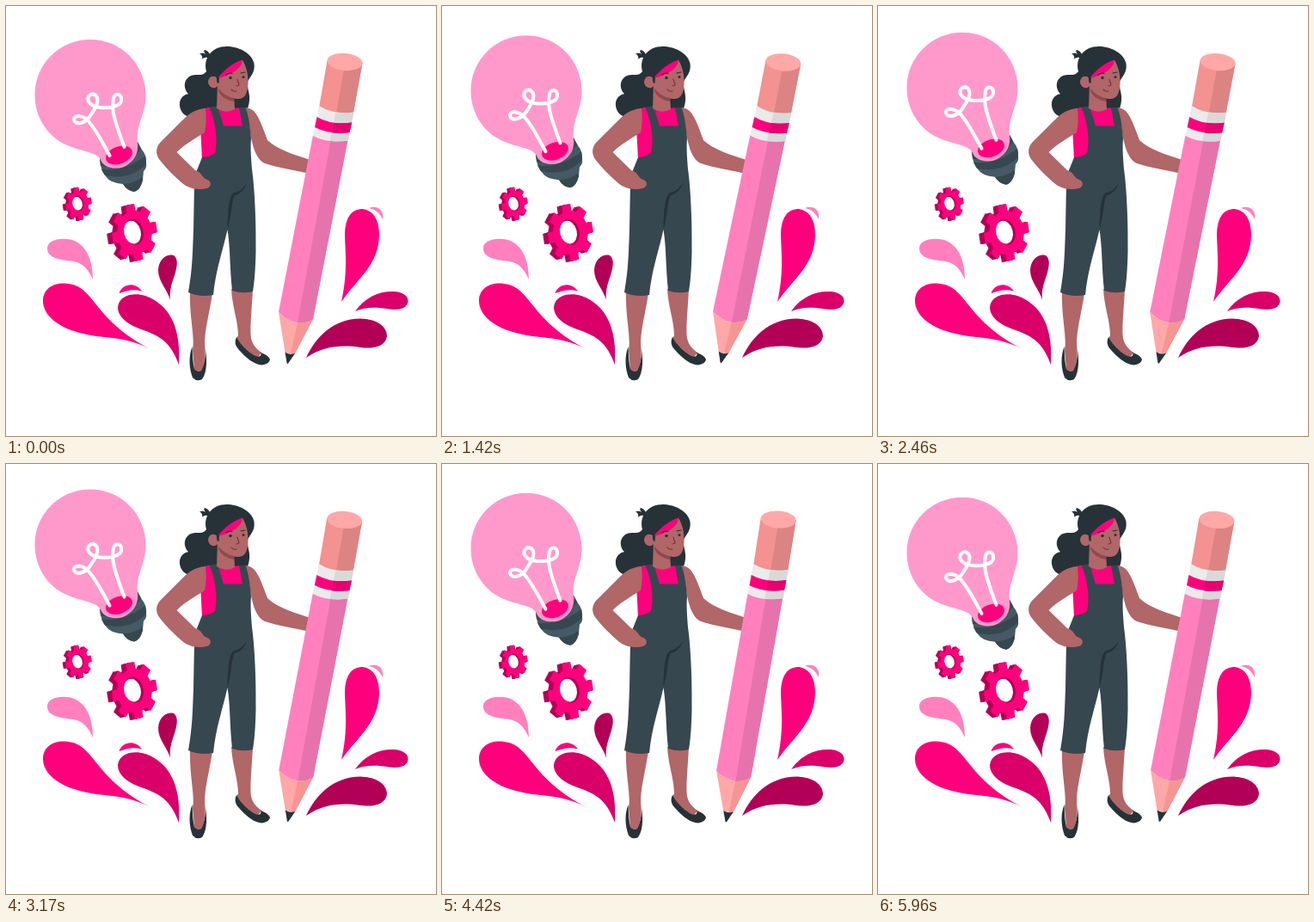
An HTML page that plays this animation: 500 by 500 pixels, repeating every 6000 ms.

```html
<!DOCTYPE html>
<html lang="en">
<head>
<meta charset="utf-8">
<title>Creative idea</title>
<style>
html, body { margin: 0; width: 100%; height: 100%; overflow: hidden; background: #fff; }
svg { display: block; width: 100%; height: 100%; }
.pink { fill: #ff007c; }
.light { fill: #ff80bd; }
.mid { fill: #d90069; }
.deep { fill: #b30057; }
.navy { fill: #37474f; }
.dark { fill: #263238; }
.skin { fill: #b16668; }
.line { fill: none; stroke: #263238; stroke-linecap: round; stroke-linejoin: round; }
</style>
</head>
<body>
<svg viewBox="0 0 500 500">
  <g id="splashes">
    <path class="light" d="M48 283C47 272 62 269 75 271.500C92 276 101 293 101 318C94 303 88 298 75 296.500C60 295 49 292 48 283Z"/>
    <path class="pink" d="M43 343C43 326 60 319 78 324C103 331 106 367 167 398.500C135 383 120 388 90 381C62 375 43 360 43 343Z"/>
    <path class="mid" d="M130 350C132 336 148 333 162 337C190 347 204 374 201 417C192 392 180 384 160 377C142 371 130 362 130 350Z"/>
    <path class="pink" d="M131.500 334C135 323 150 320 158 331.500C149 329 142 330 131.500 334Z"/>
    <path class="deep" d="M177 307C178 293 188 288 195 290C201 294 199 305 195 316C192 325 190 332 191 342C188 330 177 321 177 307Z"/>
    <path class="pink" d="M394 268C394 245 402 236 415 236C428 238 434 250 434 266C433 302 410 315 390 344C397 312 395 292 394 268Z"/>
    <path class="light" d="M422 235C432 231 440 238 438 248C434 240 430 237 422 235Z"/>
    <path class="mid" d="M406 355C418 338 435 331 452 332C463 333 468 338 467.500 344C466 352 456 354 446 352.500C430 350 418 350 406 355Z"/>
    <path class="deep" d="M349 409C360 385 380 364 412 363.500C432 364 443 373 443 384C441 396 428 399 412 397C390 394 370 395 349 409Z"/>
  </g>

  <g id="gears"></g>

  <g id="bulb">
    <path fill="#455a64" d="M109 177L153 158L158 167Q164 174 163 184Q164 188 160 192L159 202Q157 214 149 216Q141 215 136 207Q121 206 116 198Q110 192 109 177Z"/>
    <path class="navy" d="M109 177L153 158L157 166Q140 188 110 186ZM111 190Q138 193 162 174L163 184Q144 203 115 197ZM136 207Q150 206 159 199L159 203Q155 215 149 216Q141 215 136 207Z"/>
    <path fill="#ff99cc" d="M98 39C134 39 162.500 68 162.500 104C162.500 126 151 137 153 159C155 172 147 184 134 188C123 190 113 187 110 179C106 169 84 169 67 160C46 149 33.500 127 33.500 103.500C33.500 68 62 39 98 39Z"/>
    <ellipse class="pink" cx="131.500" cy="173.500" rx="16" ry="10" transform="rotate(-20 131.500 173.500)"/>
    <path fill="none" stroke="#fff" stroke-width="4" stroke-linecap="round" d="M120.500 174C111 156 104 143 96 134C90 127 79 126 79 132C80 139 91 137 97 129C101 123 104 119 106 113C108 104 102 100 97 104C92 110 99 117 109 118C120 119 133 117 134 110C135 102 127 100 125 107C122 121 126 133 137.500 164"/>
  </g>

  <g id="woman">
    <path class="dark" d="M238 63C234 58 230 60 228 62Q229 57 225 55.500Q229 54 232 56Q229 52 231 51Q235 52 237 56L242 58Z"/>
    <path class="dark" d="M236 57C241 49 250 46.500 259 47C272 48 286 55 288.500 67C290 77 284 82 281 88C280 96 284 101 283 110C282 122 276 129 268 129L240 118C230 118 222 126 213 128.500C206 128 201 120 202 112C204 104 209 103 212 102C205 95 207 83 217 80.500C224 79 229 82 233 76C231 70 232 62 236 57Z"/>
    <path class="skin" d="M214 331L240 334C237 355 232 372 231 390L231.500 402Q232 414 227 424Q222 426 219 422L217 400C220 385 213 362 214 331ZM262 329L287 329C286 350 284 368 284.500 382C285 392 290 398 297 403L292 410C282 405 272 394 268 385L270 384C270 366 263 350 262 329Z"/>
    <path class="dark" d="M216.500 396C212 408 213 422 217 432Q222 437.500 228 434C234 426 234 410 231.500 397C233 408 230 418 227 424Q222 426 219 422C217 414 217 405 216.500 396ZM268 385Q264 393 271 400C279 409 288 417 298 417.500Q306 416 307 411C305 406 300 405 296 402.500C298 408 293 409 288 406C280 401 273 394 268 385Z"/>
    <path class="skin" d="M278 118C290 119 294 128 304 156C316 167 334 173 358 180V196C336 191 316 188 301 183C290 178 285 160 283 138Z"/>
    <path class="pink" d="M230 119L245 117L247 146L245 173L228 178L226 140ZM244 121L274 118L276 142H248Z"/>
    <path class="navy" d="M236.500 118L246 116L253 139.500H275L271 118L278.500 118C282 127 284 140 285 154C284 165 285 176 286 190C289 210 291 250 290.500 285C290 306 289 320 287 332Q275 335 263 331C260 303 261 282 257.500 260C252 285 244 306 241 336Q225 339 212 333C217 305 217 285 218 260L219 206L222 191L228 176Q236 176 243 171C246 160 245 137 236.500 118Z"/>
    <path class="dark" d="M257.500 260C258 231 260 221 265 217C271 216 276 212 280 206C278 213 272 219 266 220C262 226 263 242 257.500 260Z"/>
    <path class="skin" d="M232 119C219 120 212 126 205 133L179 159C174 165 174 172 178 178C187 190 196 198 205 206C212 212 223 215 235 211.500C240 208 238 203 233 201.500C228 200 228 193 220 191L198.500 170C210 159 222 153 231 147C233 137 233 128 232 119Z"/>
    <path class="skin" d="M246 88L265 104L266 120Q256 126 245 119Z"/>
    <path class="skin" d="M246 84C258 80 270 72 274.500 62.500C279 68 282 80 281.500 90C281 103 277 108 270 108C261 108 250 101 246 93C242 98 235 94 235 88C236 81 242 80 246 84Z"/>
    <path fill="#8f4a4e" d="M247 96Q254 105 265 107L265 111Q252 109 247 99Z"/>
    <path class="pink" d="M246 84C254 74 263 66.500 274.500 62.500C276 71 263 80.500 246 84Z"/>
    <path class="dark" d="M244.500 82L248 83L247.500 90Q245 90 245 86Z"/>
    <circle class="dark" cx="261" cy="83.500" r="1.700"/>
    <circle class="dark" cx="276" cy="82.500" r="1.500"/>
    <path class="line" stroke-width="1.100" d="M256 80Q259 77 263 78.500M273 78L278 77"/>
    <path class="line" style="stroke:#7c363d" stroke-width="1.200" d="M269 85L271 92L268 93M262 97Q264 100 268 99"/>
  </g>

  <g id="pencil">
    <path fill="#f39291" d="M373.500 63L364 118L384 130L404 124L414.500 66Z"/>
    <path fill="#db8483" d="M393 74L383 130L404 124L414.500 66Z"/>
    <ellipse fill="#ffa8a7" cx="394" cy="65" rx="20.500" ry="10" transform="rotate(5 394 65)"/>
    <path class="light" d="M357 150L317 356Q326 366 339 368.500Q351 369 357 364L398 153Z"/>
    <path fill="#e673ac" d="M378.500 152L339 368.500Q351 369 357 364L398 153Z"/>
    <path fill="#ebebeb" d="M364 116Q381 127 404.500 123.500L398 156.500Q374 160 357 151Z"/>
    <path fill="#d9d9d9" d="M383.500 123.200Q394 125 404.500 123.500L398 156.500Q387 158 376.500 156.700Z"/>
    <path class="pink" d="M361.500 129Q379 139 402 135.500L399.500 147Q377 150 359 141Z"/>
    <path fill="#e60070" d="M381 135.700Q392 137 402 135.500L399.500 147Q389 148.500 379 147.200Z"/>
    <path fill="#ffa8a7" d="M317 356Q326 366 339 368.500Q351 369 357 364L335.500 405L324.500 403Z"/>
    <path fill="#f59594" d="M339 368.500Q351 369 357 364L335.500 405L331 404Z"/>
    <path class="dark" d="M324.500 402.500Q330 406 336 404L328.500 415Q327 417 326.500 415Z"/>
  </g>
</svg>
<script>
const LOOP = 6000;
const $ = id => document.getElementById(id);

// Toothed outline on a tilted ellipse
function gearPath(cx, cy, size) {
  const points = [];
  for (let i = 0; i < 8; i++) {
    for (const [turn, r] of [[-.32, .77], [-.24, 1], [.24, 1], [.32, .77]]) {
      const a = (i + turn) * Math.PI / 4 - .2;
      const x = cx + size * r * .79 * Math.cos(a);
      const y = cy + size * r * Math.sin(a);
      points.push(x.toFixed(1) + ' ' + y.toFixed(1));
    }
  }
  return 'M' + points.join('L') + 'Z';
}

function gear(cx, cy, size) {
  const side = [5, 4, 3, 2, 1].map(i =>
    `<path class="deep" d="${gearPath(cx - size * i * .035, cy + size * i * .006, size)}"/>`).join('');
  const hole = (dx, k, style) =>
    `<ellipse ${style} cx="${cx - size * dx}" cy="${cy - size * .03}" rx="${size * .31 * k}" ry="${size * .43 * k}"
      transform="rotate(-14 ${cx} ${cy})"/>`;
  return side + `<path class="pink" d="${gearPath(cx, cy, size)}"/>` +
    hole(.02, 1.06, 'class="deep"') + hole(.07, .94, 'fill="#fff"');
}

$('gears').innerHTML = gear(149.5, 263.5, 33.5) + gear(84.5, 230, 19.5);

function draw(now) {
  const p = now % LOOP / LOOP;
  const lift = 10 * (1 - Math.abs(1 - 2 * p));
  const sway = p < .25 ? 4 * p : p < .75 ? 2 - 4 * p : 4 * p - 4;
  $('bulb').setAttribute('transform', `translate(0 ${-lift})`);
  $('pencil').setAttribute('transform', `rotate(${sway} 366 235)`);
}

const start = performance.now();
function tick() {
  draw(performance.now() - start);
  requestAnimationFrame(tick);
}
tick();
</script>
</body>
</html>
```
